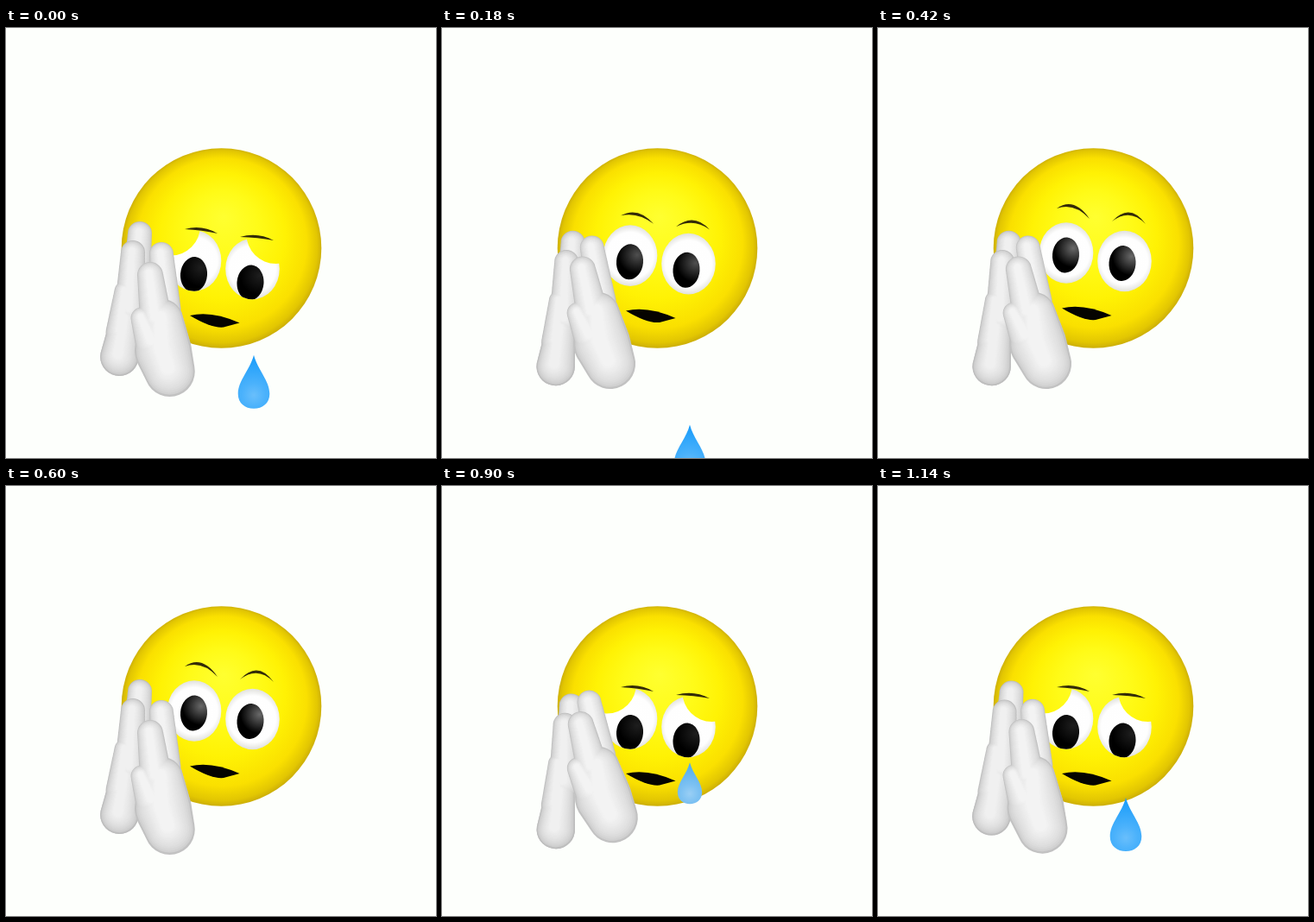
Write an HTML page with a canvas that moves like this. It is 498 px wide and 498 px high and loops after 1200 ms.

```html
<!DOCTYPE html>
<html>
<head>
<meta charset="utf-8">
<style>
  html, body { margin: 0; height: 100%; overflow: hidden; background: #fdfffc; }
  canvas { display: block; }
</style>
</head>
<body>
<canvas id="stage" width="498" height="498"></canvas>
<script>
const g = document.getElementById('stage').getContext('2d');
const STEP = 60, STEPS = 20;
const lerp = (a, b, t) => a + (b - a) * t;
const wave = u => (1 - Math.cos(Math.PI * u)) / 2;
const clamp = v => Math.max(0, Math.min(1, v));
const gray = v => `rgb(${v},${v},${v})`;

// Each hand is a set of tapered capsules: x, y, radius at both ends
const BACK = {
  pivot: [138, 320], shift: [-2, 17], turn: -.04, edge: 190, light: 240,
  fingers: [[155, 238, 14, 150, 310, 17], [147, 260, 14, 143, 330, 18]],
  palm: [[138, 338, 17, 131, 383, 22.5], [138, 305, 12.5, 133, 355, 18]]
};
const FRONT = {
  pivot: [180, 335], shift: [0, -12], turn: -.13, edge: 194, light: 243,
  fingers: [[180, 262, 14, 186, 328, 17], [167, 286, 15, 174, 340, 19]],
  palm: [[181, 338, 24, 182, 374, 33], [182, 374, 33, 190, 399, 29], [157, 336, 12.5, 170, 366, 20]]
};

function radial(x, y, x2, y2, r, ...colors) {
  const grad = g.createRadialGradient(x, y, 0, x2, y2, r);
  colors.forEach(([at, color]) => grad.addColorStop(at, color));
  return grad;
}

function drawHead() {
  g.beginPath();
  g.arc(249.5, 255, 115.8, 0, 7);
  g.fillStyle = radial(252, 218, 249.5, 255, 117,
    [0, '#ffff30'], [.35, '#fffb18'], [.62, '#fff204'], [.84, '#fae000'], [.95, '#e2c602'], [1, '#c8aa08']);
  g.fill();
}

// The lid is a disc on the outer side that slides down over the eye
function drawEye(x, y, side, sad) {
  const cy = y + 9 * sad;
  g.save();
  g.beginPath();
  g.rect(0, 0, 498, 498);
  g.arc(x + side * 27, y - 82 + 51 * sad, 34, 0, 7);
  g.clip('evenodd');
  g.beginPath();
  g.ellipse(x, cy, 31.3, 35.3, 0, 0, 7);
  g.fillStyle = radial(x, cy, x, cy, 36, [0, '#fff'], [.75, '#fefefe'], [1, '#dededa']);
  g.fill();
  g.clip();
  const py = y + 2.5 + 22.5 * sad;
  g.beginPath();
  g.ellipse(x - side - 1.5, py, 15.5, 20.5, .08, 0, 7);
  g.fillStyle = radial(x + 8, py - 8, x + 8, py - 8, 22, [0, gray(Math.round(lerp(105, 30, sad)))], [1, '#000']);
  g.fill();
  g.restore();
}

function drawBrow(x1, y1, x2, y2, arch) {
  const mx = (x1 + x2) / 2 + 1, my = (y1 + y2) / 2;
  g.beginPath();
  g.moveTo(x1, y1);
  g.quadraticCurveTo(mx, my - arch, x2, y2);
  g.quadraticCurveTo(mx, my - arch + 6.5, x1, y1);
  g.fillStyle = '#332b08';
  g.fill();
}

function drawMouth(y) {
  g.beginPath();
  g.moveTo(213, y);
  g.quadraticCurveTo(238, y - 6, 270.5, y + 8.5);
  g.lineTo(252, y + 13.5);
  g.quadraticCurveTo(238, y + 15, 213, y);
  g.fillStyle = '#050400';
  g.fill();
}

// Nested, ever lighter layers give the rounded look
function drawSolid(capsules, edge, light) {
  const layers = 12;
  for (let n = 0; n < layers; n++) {
    const t = n / (layers - 1);
    g.fillStyle = gray(Math.round(lerp(edge, light, Math.sqrt(t))));
    g.beginPath();
    for (const [x1, y1, r1, x2, y2, r2] of capsules) {
      for (let u = 0; u <= 1; u += .05) {
        const r = lerp(r1, r2, u), cr = r * (1 - t * .75);
        const x = lerp(x1, x2, u) - t * r * .08, y = lerp(y1, y2, u) - t * r * .15;
        g.moveTo(x + cr, y);
        g.arc(x, y, cr, 0, 7);
      }
    }
    g.fill();
  }
}

function drawHand({ pivot: [x, y], shift, turn, edge, light, fingers, palm }, pose) {
  g.save();
  g.translate(x + shift[0] * pose, y + shift[1] * pose);
  g.rotate(turn * pose);
  g.translate(-x, -y);
  drawSolid([fingers[0], palm[0]], edge, light);
  drawSolid([fingers[1], ...palm], edge, light);
  g.restore();
}

function drawTear(j) {
  const h = Math.min(62, 40 + 4 * j), w = h * .295, t = clamp(j / 6);
  const x = 287, y = 309.5 + 5 * j + .1 * j ** 3;
  const blue = l => `hsl(205,${lerp(75, 96, t)}%,${lerp(l + 12, l, t)}%)`;
  g.beginPath();
  g.moveTo(x, y);
  for (const [s, from, to] of [[1, 0, 1], [-1, 1, 0]]) {
    const at = v => y + h * v;
    if (s > 0) {
      g.bezierCurveTo(x + w * .25, at(.28), x + w, at(.48), x + w, at(.72));
      g.bezierCurveTo(x + w, at(.9), x + w * .55, at(1), x, at(1));
    } else {
      g.bezierCurveTo(x - w * .55, at(1), x - w, at(.9), x - w, at(.72));
      g.bezierCurveTo(x - w, at(.48), x - w * .25, at(.28), x, y);
    }
  }
  const cy = y + h * .75;
  g.fillStyle = radial(x, cy, x, cy, h * .72, [0, blue(70)], [.3, blue(64)], [1, blue(54)]);
  g.fill();
}

function draw(k) {
  const sad = k < 10 ? 1 - wave(clamp(k / 5)) : wave(clamp((k - 10) / 5));
  const pose = wave(k / 5);
  g.clearRect(0, 0, 498, 498);
  drawHead();
  const arch = lerp(17, 8, sad);
  drawBrow(207, lerp(209, 233, sad), 245, lerp(221, 238, sad), arch + 3 * (1 - sad));
  drawBrow(271, lerp(224, 242, sad), 310, lerp(227, 246, sad), arch + 7 * (1 - sad));
  drawEye(218, 260.5, -1, sad);
  drawEye(285.5, 270, 1, sad);
  drawMouth(lerp(324.5, 333, sad));
  drawHand(BACK, pose);
  drawHand(FRONT, pose);
  const age = (k + 9) % STEPS;
  if (age < 14) drawTear(age - 2);
}

let last = -1;
function tick() {
  const k = Math.floor(performance.now() / STEP) % STEPS;
  if (k !== last) draw(last = k);
  requestAnimationFrame(tick);
}
tick();
</script>
</body>
</html>
```
